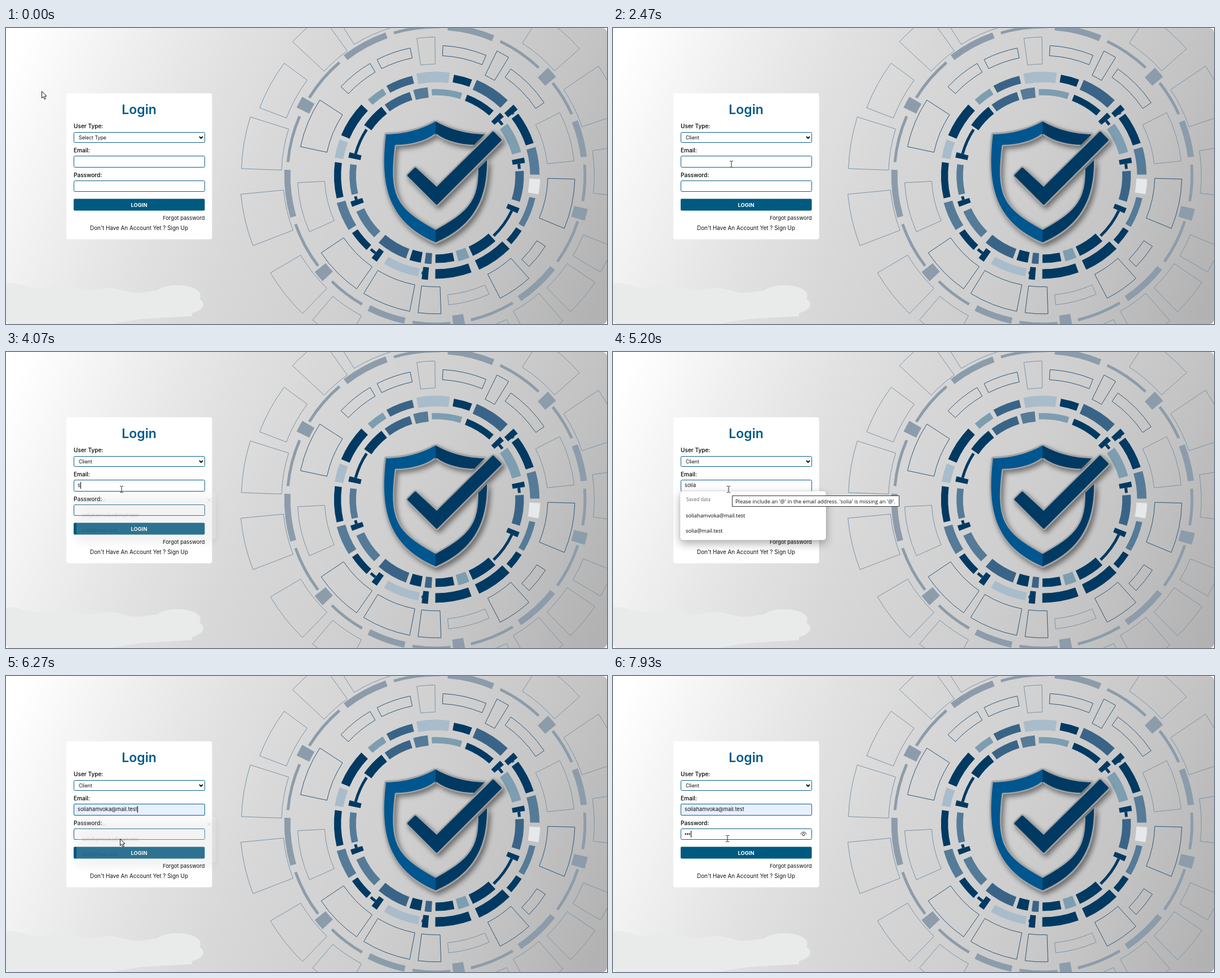
Recreate the animation shown at these times as an HTML page with a canvas. Size 1066 by 526 pixels, loop 8000 ms.

```html
<!DOCTYPE html>
<html lang="en">
<head>
<meta charset="utf-8">
<title>Login</title>
<style>
html, body { margin: 0; width: 100%; height: 100%; overflow: hidden; background: #fff; }
canvas { display: block; }
</style>
</head>
<body>
<canvas id="stage" width="1066" height="526"></canvas>
<script>
const W = 1066, H = 526, LOOP = 8000;
const ctx = document.getElementById('stage').getContext('2d');
const UI = 'Inter, "Open Sans", sans-serif', SYS = '"Open Sans", "Noto Sans", sans-serif';
const NAVY = '#003a63', BLUE = '#005a80', LINE = '#0a5f85';
const EMAIL = 'soliahamvoka@mail.test', SHORT = 'solia@mail.test';

function layer(draw) {
  const c = document.createElement('canvas');
  c.width = W; c.height = H;
  draw(c.getContext('2d'));
  return c;
}

function text(g, s, x, y, size, color = '#111', weight = 400, align = 'left', font = UI) {
  g.font = `${weight} ${size}px ${font}`;
  g.textAlign = align;
  g.fillStyle = color;
  g.fillText(s, x, y);
}

function box(g, x, y, w, h, r, fill, line) {
  g.beginPath();
  g.roundRect(x, y, w, h, r);
  if (fill) { g.fillStyle = fill; g.fill(); }
  if (line) { g.strokeStyle = line; g.lineWidth = 1; g.stroke(); }
}

function poly(g, pts, close) {
  g.beginPath();
  for (let i = 0; i < pts.length; i += 2) g.lineTo(pts[i], pts[i + 1]);
  if (close) g.closePath();
}

// Repeatable noise in 0..1.
function noise(n) {
  const v = Math.sin(n * 12.9898) * 43758.5453;
  return v - Math.floor(v);
}

function segment(g, r, w, a, span) {
  const k = Math.PI / 180, b = (a + span) * k;
  g.beginPath();
  g.arc(763, 262, r + w / 2, a * k, b);
  g.arc(763, 262, r - w / 2, b, a * k, true);
  g.closePath();
}

// Each block runs from its start angle towards the next one, up to a limit.
function ring(starts, gap, limit, draw) {
  starts.forEach((a, i) => {
    const next = i + 1 < starts.length ? starts[i + 1] : starts[0] + 360;
    draw(a, Math.min(next - a - gap, limit), i, next);
  });
}

const tones = [NAVY, '#3a6487', '#557b98', '#7d9db1', '#a9bccb', '#e6e9ec'];

// Solid blocks; a wide gap holds a radial bar and a thin arc.
function solidRing(g, r, starts, shades) {
  ring(starts, 2.5, 20.5, (a, span, i, next) => {
    g.fillStyle = tones[shades[i]];
    segment(g, r, span < 9 ? 19 : 11 + 8 * noise(i + r), a, span); g.fill();
    const end = a + span;
    if (next - end < 8) return;
    g.fillStyle = NAVY;
    segment(g, r, 22, end + 4, 3.5); g.fill();
    segment(g, r, 5, end + 7.5, next - end - 9); g.fill();
  });
}

// Square blocks joined by arcs that are thin and thick in turn.
function greyRing(g) {
  g.fillStyle = '#8c9cab';
  ring([14.5, 81, 139, 208, 318], 0, 360, (a, span) => {
    segment(g, 263, 25, a - 2, 4.5); g.fill();
    const n = Math.round(span / 22), step = (span - 5) / n;
    for (let i = 0; i < n; i++) {
      segment(g, 264, i % 2 ? 11 : 5, a + 3.5 + i * step, step - 3); g.fill();
    }
  });
}

function outlineRing(g, r, starts, limit, thick, color) {
  ring(starts, 3.5, limit, (a, span, i) => {
    g.strokeStyle = color(i);
    segment(g, r, thick(a, i), a, span); g.stroke();
  });
}

function drawRings(g) {
  g.lineWidth = 1;
  const thin = [33, 66, 223, 243, 273, 305];
  outlineRing(g, 222, [1.5, 33, 48, 66, 88, 101, 125, 156, 192, 223, 243, 262, 273, 296, 305, 333], 21,
    a => thin.includes(a) ? 18 : 48, i => i % 4 === 3 ? '#7a93a8' : '#2a567a');
  outlineRing(g, 310, [22, 34, 49, 64, 118, 134, 159, 182, 201, 223, 238, 303, 326, 351], 15.5,
    (a, i) => 45 + 32 * noise(i + 4), () => '#7a93a8');
  greyRing(g);
  solidRing(g, 148, [-145, -126, -105, -93, -69, -36, -3, 48, 68, 78, 93, 100, 110, 135, 167],
    [0, 1, 2, 3, 0, 3, 1, 0, 3, 0, 1, 0, 1, 2, 2]);
  solidRing(g, 175, [-157, -132, -119, -101, -80, -67, -37, -16, 2, 13, 33, 45, 70, 100, 133, 148, 167, 190],
    [0, 3, 1, 4, 0, 1, 0, 2, 5, 2, 0, 0, 0, 4, 0, 2, 0, 4]);
}

// Half of the shield is described, the other half mirrored.
function shield(g, top, side, shoulder, low, bottom) {
  const mid = 762, m = d => [mid - d, mid + d];
  const [l, r] = m(side), [l2, r2] = m(side + 10), [l3, r3] = m(low);
  g.beginPath();
  g.moveTo(mid, top);
  g.bezierCurveTo(mid - side * .27, top + 14, mid - side * .65, shoulder, l, shoulder);
  g.bezierCurveTo(l2, shoulder + 85, l3, bottom - 38, mid, bottom);
  g.bezierCurveTo(r3, bottom - 38, r2, shoulder + 85, r, shoulder);
  g.bezierCurveTo(mid + side * .65, shoulder, mid + side * .27, top + 14, mid, top);
}

const emblem = layer(g => {
  g.lineJoin = 'round';
  shield(g, 166, 88, 189, 88, 381);
  g.strokeStyle = '#a3a3a3';
  g.lineWidth = 6;
  g.stroke();
  g.save();
  g.clip();
  g.fillStyle = '#00568f'; g.fillRect(650, 150, 112, 240);
  g.fillStyle = NAVY; g.fillRect(762, 150, 112, 240);
  g.restore();
  shield(g, 190, 70, 210, 70, 356);
  g.lineWidth = 5;
  g.stroke();
  g.globalCompositeOperation = 'destination-out';
  g.fill();
  poly(g, [864, 186, 877, 199, 764, 312, 714, 262, 726, 250, 764, 285], true);
  g.lineWidth = 17;
  g.stroke();
  g.globalCompositeOperation = 'source-over';
  g.lineWidth = 9;
  g.stroke();
  g.strokeStyle = g.fillStyle = NAVY;
  g.lineWidth = 4;
  g.stroke(); g.fill();
});

// Brushed patch in the lower left corner.
function drawPatch(g) {
  g.fillStyle = '#e9ebeb';
  g.beginPath();
  g.moveTo(0, H);
  for (let x = 0; x <= 330; x += 5) g.lineTo(x, 456 + x * .05 + 3 * Math.sin(x / 14 + 4));
  g.lineTo(330, 512);
  g.lineTo(240, 517);
  g.lineTo(185, H);
  g.fill();
  for (const [x, y] of [[304, 475], [309, 491]]) {
    g.beginPath(); g.ellipse(x, y, 41, 18, 0, 0, 7); g.fill();
  }
}

const scene = layer(g => {
  g.fillStyle = '#fff';
  g.fillRect(0, 0, W, H);
  g.beginPath();
  g.roundRect(0, 0, W, H, 8);
  g.clip();
  const bg = g.createLinearGradient(30, 20, 1060, 470);
  [[0, '#fff'], [.16, '#efefef'], [.3, '#e2e2e2'], [.45, '#d7d7d7'], [.65, '#cfcfcf'], [.82, '#c4c4c4'], [1, '#b2b2b2']]
    .forEach(s => bg.addColorStop(...s));
  g.fillStyle = bg;
  g.fillRect(0, 0, W, H);
  drawPatch(g);
  drawRings(g);

  g.save();
  g.shadowColor = 'rgba(0,0,0,.45)';
  g.shadowBlur = 8;
  g.shadowOffsetX = 4;
  g.shadowOffsetY = 5;
  g.drawImage(emblem, 0, 0);
  g.restore();

  box(g, 107, 116, 258.5, 259.5, 4, '#fff');
  text(g, 'Login', 236, 153, 23, '#005a87', 600, 'center');
  text(g, 'User Type:', 120, 178, 10.1, '#000', 500);
  text(g, 'Email:', 120, 220.5, 10.1, '#000', 500);
  text(g, 'Password:', 120, 264.5, 10.1, '#000', 500);
  for (const [y, h] of [[185.5, 18], [227.5, 20], [271.5, 19]]) box(g, 120.5, y, 232, h, 2, '#fff', LINE);
  poly(g, [343, 193, 346, 196, 349, 193]);
  g.strokeStyle = '#000'; g.lineWidth = 1.8; g.stroke();
  box(g, 120, 303.5, 232.5, 21, 2, BLUE);
  text(g, 'LOGIN', 236, 317.5, 9.4, '#fff', 700, 'center');
  text(g, 'Forgot password', 352.5, 341, 9.4, '#111', 400, 'right');
  text(g, "Don't Have An Account Yet ? Sign Up", 236, 358.5, 9.9, '#111', 400, 'center');
});

// Time, x, y of the pointer.
const route = [[0, 63, 112], [600, 266, 154], [733, 266, 154], [1067, 266, 190], [1400, 266, 190], [1667, 233, 241],
  [1930, 226, 254], [2267, 214, 240], [2733, 205, 244], [5333, 205, 244], [6200, 202, 289], [8000, 203, 289]];

function pointerAt(t) {
  let i = 1;
  while (i < route.length - 1 && route[i][0] < t) i++;
  const [a, x, y] = route[i - 1], [b, u, v] = route[i];
  const p = fade(t, a, b), e = p * p * (3 - 2 * p);
  return [x + (u - x) * e, y + (v - y) * e];
}

function drawPointer(t, x, y) {
  const beam = (t > 560 && t < 760) || (t > 2460 && y < 249) || t > 6320;
  ctx.save();
  ctx.translate(Math.round(x), Math.round(y));
  if (beam) {
    ctx.fillStyle = '#222';
    ctx.fillRect(-.5, -5, 1, 10);
    for (const v of [-6, 5]) { ctx.fillRect(-3, v, 2.5, 1); ctx.fillRect(.5, v, 2.5, 1); }
  } else {
    poly(ctx, [.5, .5, .5, 12.5, 3.3, 10, 5.3, 14.7, 7.3, 13.8, 5.3, 9.3, 9, 9.1], true);
    ctx.fillStyle = '#fff'; ctx.fill();
    ctx.strokeStyle = '#111'; ctx.lineWidth = 1; ctx.stroke();
  }
  ctx.restore();
}

function dots(n, x, y, step, r, color) {
  ctx.fillStyle = color;
  for (let i = 0; i < n; i++) {
    ctx.beginPath();
    ctx.arc(x + i * step, y, r, 0, 7);
    ctx.fill();
  }
}

function caret(x, y) {
  ctx.fillStyle = '#000';
  ctx.fillRect(Math.round(x), y, 1, 12);
}

function shadowBox(x, y, w, h, r, blur, dy, alpha) {
  ctx.save();
  ctx.shadowColor = `rgba(0,0,0,${alpha})`;
  ctx.shadowBlur = blur;
  ctx.shadowOffsetY = dy;
  box(ctx, x, y, w, h, r, '#fff');
  ctx.restore();
}

function dropdown(hover) {
  shadowBox(120, 207, 232.5, 63, 0, 6, 1, .4);
  box(ctx, 120.5, 207.5, 231.5, 62, 0, null, '#b5b5b5');
  ['Select Type', 'Client', 'Employee'].forEach((s, i) => {
    if (i === hover) box(ctx, 121, 208 + i * 20.2, 230.5, 20.2, 0, '#767676');
    text(ctx, s, 129, 221.2 + i * 20.3, 9.3, i === hover ? '#fff' : '#111');
  });
}

function popup(y, accounts, alpha, hover) {
  if (alpha <= 0) return;
  const h = accounts ? 122 : 86.5, s = .945 + .055 * alpha;
  const say = (str, x, v, size, color = '#000') => text(ctx, str, x, v, size, color, 400, 'left', SYS);
  ctx.save();
  ctx.globalAlpha = alpha;
  ctx.translate(248.5, y + h / 2);
  ctx.scale(s, s);
  ctx.translate(-248.5, -h / 2);
  shadowBox(119, -1, 259, h + 1, 5, 16, 6, .32);
  box(ctx, 118.7, -1, 259.6, h + 1, 5, null, 'rgba(0,0,0,.12)');
  if (hover) box(ctx, 122, 29, 253, 27, 3, '#eee');
  say(accounts ? 'Saved accounts' : 'Saved data', 130, 17, 8.4, '#666');
  ctx.strokeStyle = '#333';
  ctx.lineWidth = 1;
  poly(ctx, [362, 10.5, 369, 17.5]); ctx.stroke();
  poly(ctx, [369, 10.5, 362, 17.5]); ctx.stroke();
  say(accounts ? 'staffdesk' : EMAIL, 129, 45.5, 9.3);
  say(accounts ? 'domil@mail.test' : SHORT, 129, 73, 9.3);
  if (accounts) {
    dots(9, 333.5, 43, 4, 1.25, '#666');
    dots(8, 337.5, 70.5, 4, 1.25, '#666');
    ctx.fillStyle = '#ddd';
    ctx.fillRect(119, 86, 259, 1);
    ctx.beginPath(); ctx.arc(136, 102.5, 3.2, 0, 7); ctx.stroke();
    poly(ctx, [133.5, 105, 129.5, 109, 132, 109, 132, 107]); ctx.stroke();
    say('Manage passwords in Meridoval Wallet', 150, 108, 9.2);
  }
  ctx.restore();
}

const fade = (t, a, b) => Math.max(0, Math.min(1, (t - a) / (b - a)));
const typedBy = (t, times) => times.filter(k => t >= k).length;

function render(t) {
  const [px, py] = pointerAt(t);
  ctx.drawImage(scene, 0, 0);
  text(ctx, t < 2460 ? 'Select Type' : 'Client', 129, 198, 8.8);

  const picked = t > 5400 && py > 277;
  const typed = picked ? EMAIL : 'solia'.slice(0, typedBy(t, [3860, 4120, 4330, 4530, 4665]));
  if (picked) box(ctx, 120.5, 227.5, 232, 20, 2, '#e8f0fe', LINE);
  text(ctx, typed, 127, 240, 9.3);
  const end = 127 + ctx.measureText(typed).width;
  if ((t > 2790 && t < 3395) || (t > 3860 && t < 5195) || (t > 5730 && t < 6660)) caret(end, 231);

  const keys = typedBy(t, [7460, 7660, 7930]);
  dots(keys, 128.7, 280.8, 3.5, 1.3, '#111');
  if (t > 6660 && (t < 7262 || keys)) caret(127 + keys * 3.5, 275);
  if (keys) {
    ctx.strokeStyle = '#222';
    ctx.lineWidth = 1;
    ctx.beginPath(); ctx.ellipse(338, 281.5, 5, 4.2, 0, Math.PI, 0); ctx.stroke();
    ctx.beginPath(); ctx.arc(338, 281.7, 2.1, 0, 7); ctx.stroke();
  }

  if (t > 1260 && t < 2460) dropdown(py < 228 ? 0 : py < 248.5 ? 1 : 2);
  popup(248, true, fade(t, 2760, 2925) * (1 - fade(t, 3850, 4000)));
  popup(248, false, fade(t, 4040, 4190) * (1 - fade(t, 6180, 6285)), picked);
  popup(292, true, fade(t, 6630, 6730) * (1 - fade(t, 7445, 7610)));

  if (t > 5195 && t < 5395) {
    box(ctx, 211.5, 255.5, 296, 19, 0, '#fff', '#333');
    text(ctx, "Please include an '@' in the email address. 'solia' is missing an '@'.", 217, 269, 9.3, '#111', 400, 'left', SYS);
  }
  drawPointer(t, px, py);
}

// The picture steps fifteen times a second.
function tick() {
  const t = performance.now() % LOOP;
  render(Math.floor(t * .015 + .1) / .015);
  requestAnimationFrame(tick);
}
tick();
</script>
</body>
</html>
```
